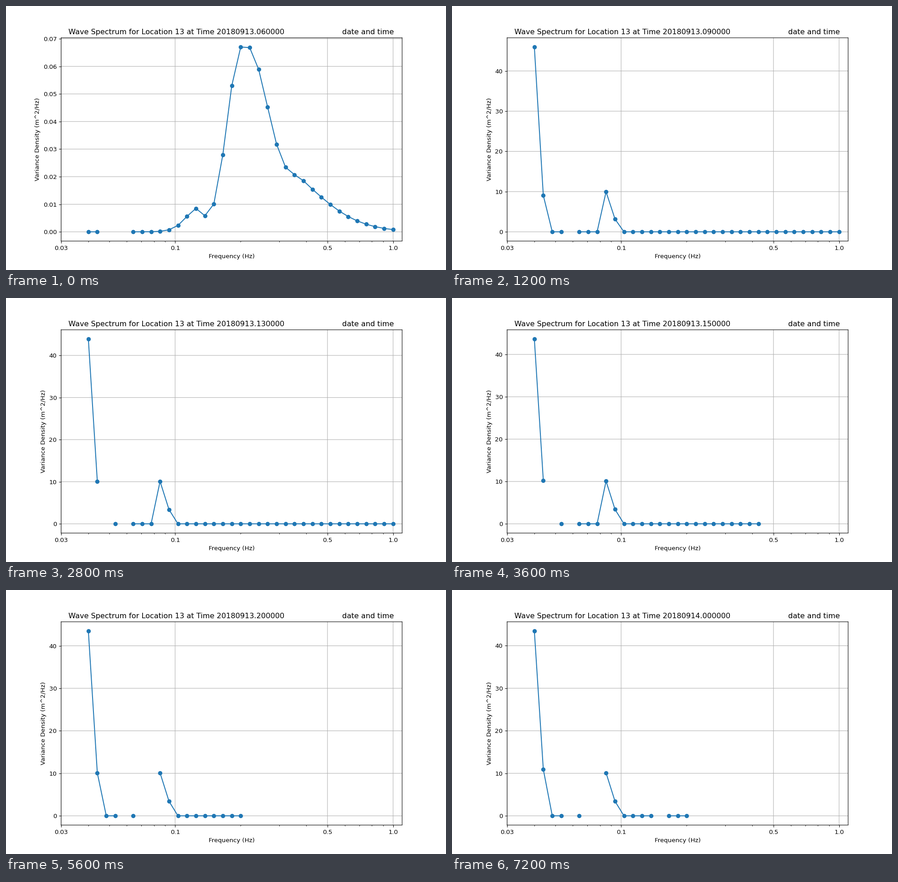
Recreate the animation shown at these times as a matplotlib script. Size 966 by 580 pixels, loop 7600 ms.

```python
import matplotlib.pyplot as plt
import numpy as np
from matplotlib.animation import FuncAnimation
from matplotlib.ticker import NullFormatter

W, H, DPI = 966, 580, 96.6
FRAMES, INTERVAL = 19, 400
FIRST_HOUR = 6
NUDGE = 0.25  # sub-pixel offset of the axes, right and down

plt.rcParams["path.snap"] = False

bins = np.arange(35)
freqs = np.geomspace(0.04, 1.0, len(bins))

# Hour from which a bin stays empty.
empty_from = {4: 6, 6: 19, 7: 17, 14: 21}


def bump(center, height, left, right, power):
    """Bell over the bins with its own width on either side."""
    offset = bins - center
    width = np.where(offset < 0, left, right)
    return height * np.exp(-np.abs(offset / width) ** power)


def wind_sea():
    density = (bump(11.9, 0.0085, 1.6, 1.4, 1.5)
               + bump(17.3, 0.0668, 2.42, 3.62, 2.3)
               + bump(23.5, 0.0180, 3.0, 4.93, 1.5))
    density[2:5] = np.nan
    return density


def swell(hour):
    settling = np.exp((9 - hour) / 2.3)
    density = np.zeros(len(bins))
    density[0] = 43.45 + 2.5 * settling
    density[1] = np.interp(hour, [7, 9, 11, 18, 20, 24],
                           [7.0, 9.05, 9.96, 10.5, 10.1, 10.92])
    density[8] = 10.1 - 0.14 * settling
    density[9] = 3.42 - 0.25 * settling

    for k, start in empty_from.items():
        if hour >= start:
            density[k] = np.nan
    if 13 <= hour < 20:
        density[2] = np.nan
    # From 14 h on, the high frequencies drop out two bins an hour.
    if hour >= 14:
        density[max(17, 55 - 2 * hour) + 1:] = np.nan
    return density


fig = plt.figure(figsize=((W + 0.01) / DPI, (H + 0.01) / DPI), dpi=DPI)
ax = fig.add_axes([0.125 + NUDGE / W, 0.11 - NUDGE / H, 0.775, 0.77])
ax.set_xscale("log")
ax.set_xlim(0.03, 1.1)
ax.set_xticks([0.03, 0.1, 0.5, 1.0], ["0.03", "0.1", "0.5", "1.0"])
ax.xaxis.set_minor_formatter(NullFormatter())
ax.set_xlabel("Frequency (Hz)")
ax.set_ylabel("Variance Density (m^2/Hz)")
ax.grid(True)
line, = ax.plot(freqs, wind_sea(), marker="o", color="#1f77b4")

title_y = 1 - 61.6 / H
title = fig.text(374.5 / W, title_y, "", fontsize=12, ha="center")
fig.text(852 / W, title_y, "date and time", fontsize=12, ha="right")


def update(i):
    hour = FIRST_HOUR + i
    density = swell(hour) if i else wind_sea()
    peak = np.nanmax(density)
    line.set_ydata(density)
    ax.set_ylim(-0.05 * peak, 1.05 * peak)
    day = 20180913 + hour // 24
    title.set_text("Wave Spectrum for Location 13 at Time "
                   f"{day}.{hour % 24:02d}0000")
    return line, title


anim = FuncAnimation(fig, update, frames=FRAMES, interval=INTERVAL,
                     repeat=True, repeat_delay=0, blit=False)
plt.show()
```
